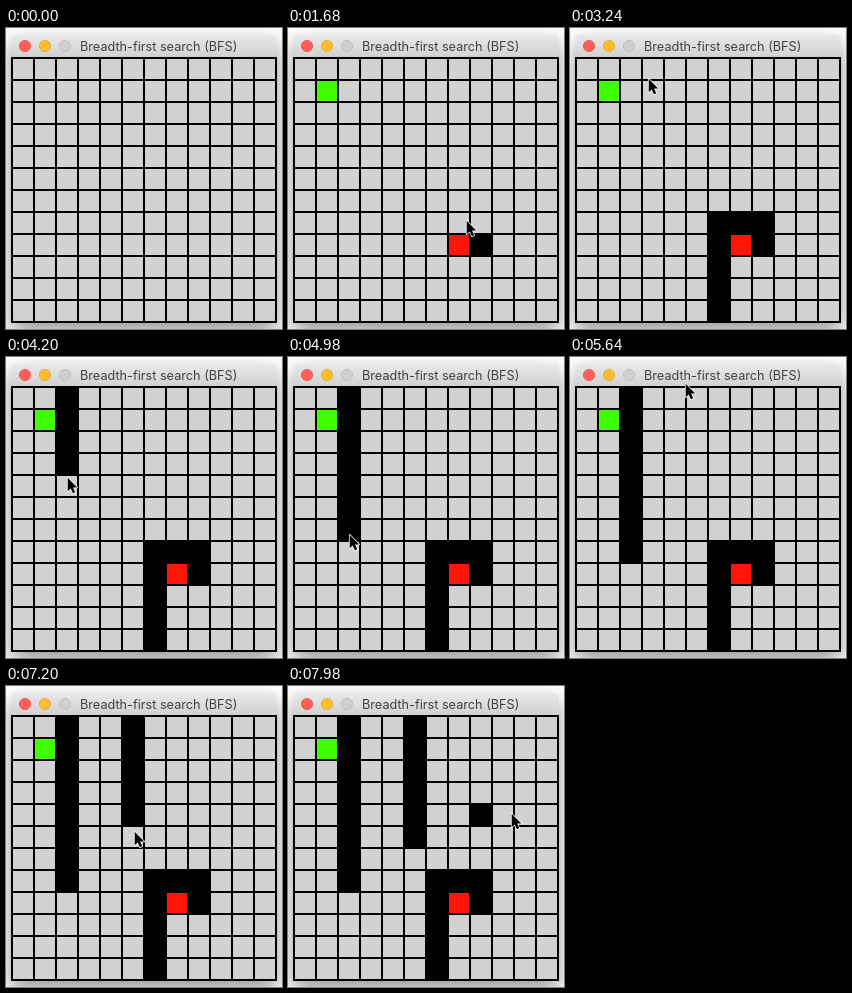
Animation, 276 px wide and 301 px high, one loop 8000 ms. Source, as an HTML page with a canvas:

```html
<!DOCTYPE html>
<html lang="en">
<head>
<meta charset="utf-8">
<title>Breadth-first search (BFS)</title>
<style>
html, body { margin: 0; width: 100%; height: 100%; overflow: hidden; background: #fff; }
canvas { display: block; width: 276px; height: 301px; }
</style>
</head>
<body>
<canvas id="stage" width="276" height="301"></canvas>
<script>
const ctx = document.getElementById('stage').getContext('2d');
const LOOP = 8000, STEP = 60, CELL = 22, COUNT = 12;
const GREEN = '#40ff00', RED = '#ff1408', BLACK = '#000';

// Pointer path: time, x, y
const path = [
  [360, 95, 176], [540, 43, 62], [780, 43, 62],
  [1080, 170, 210], [1320, 193, 216], [1500, 193, 216],
  [1680, 178, 192], [1800, 186, 194], [2100, 152, 195], [2340, 150, 200],
  [2760, 149, 276], [2880, 147, 270], [3120, 104, 132],
  [3240, 78, 50], [3360, 61, 38], [3540, 61, 38],
  [4200, 61, 120], [4380, 61, 126], [4560, 61, 159], [4740, 61, 159],
  [5160, 61, 191], [5280, 65, 150], [5520, 103, 13],
  [5640, 115, 26], [5820, 128, 40], [6360, 129, 83],
  [6420, 128, 92], [7200, 128, 145], [7440, 162, 88],
  [7680, 193, 127], [7800, 194, 127], [7980, 223, 127]
];

function light(x, fill, edge) {
  ctx.beginPath();
  ctx.arc(x, 18, 5.6, 0, Math.PI * 2);
  ctx.fillStyle = fill;
  ctx.fill();
  ctx.strokeStyle = edge;
  ctx.lineWidth = 0.7;
  ctx.stroke();
}

function drawWindow() {
  ctx.fillStyle = '#fff';
  ctx.fillRect(0, 0, 276, 301);
  ctx.save();
  ctx.shadowColor = 'rgba(0,0,0,.42)';
  ctx.shadowBlur = 22;
  ctx.shadowOffsetY = 9;
  const bar = ctx.createLinearGradient(0, 7, 0, 29);
  bar.addColorStop(0, '#e9e9e9');
  bar.addColorStop(1, '#d1d1d1');
  ctx.fillStyle = bar;
  ctx.beginPath();
  ctx.roundRect(5, 7, 266, 288, [5, 5, 0, 0]);
  ctx.fill();
  ctx.restore();

  light(19, '#ff5f56', '#e2463f');
  light(39, '#ffbd2e', '#dfa023');
  light(59, '#cfcfcf', '#b9b9b9');
  ctx.fillStyle = '#434343';
  ctx.font = '12.7px Inter, "Open Sans", sans-serif';
  ctx.fillText('Breadth-first search (BFS)', 74, 23);
}

function fillCell(col, row, color) {
  ctx.fillStyle = color;
  ctx.fillRect(7 + col * CELL, 31 + row * CELL, CELL - 2, CELL - 2);
}

// A wall covers its inner grid lines as well
function wall(t, start, gap, col, row, count, dx = 0, dy = 1) {
  for (let i = 0; i < count && t >= start + i * gap; i++)
    block(col + i * dx, row + i * dy);
}

const walls = new Set();
function block(col, row) {
  walls.add(row * COUNT + col);
}

function drawGrid(t) {
  ctx.fillStyle = BLACK;
  ctx.fillRect(5, 29, 266, 266);
  walls.clear();
  wall(t, 1500, 0, 8, 8, 1);
  wall(t, 1800, 180, 8, 7, 3, -1, 0);
  wall(t, 2400, 120, 6, 8, 4);
  wall(t, 3540, 210, 2, 0, 4);
  wall(t, 4380, 360, 2, 4, 2);
  wall(t, 4980, 180, 2, 6, 2);
  wall(t, 5820, 240, 5, 0, 2);
  wall(t, 6420, 280, 5, 2, 4);
  wall(t, 7740, 0, 8, 4, 1);
  for (let row = 0; row < COUNT; row++)
    for (let col = 0; col < COUNT; col++)
      if (!walls.has(row * COUNT + col)) fillCell(col, row, '#d2d1d2');
  if (t >= 780) fillCell(1, 1, GREEN);
  if (t >= 1140) fillCell(7, 8, RED);
}

function pointerAt(t) {
  const i = path.findIndex(p => p[0] > t);
  if (i < 0) return path[path.length - 1].slice(1);
  const [t0, x0, y0] = path[i - 1], [t1, x1, y1] = path[i];
  const k = (t - t0) / (t1 - t0);
  return [x0 + (x1 - x0) * k, y0 + (y1 - y0) * k];
}

const arrow = new Path2D('M.7 .8V14.2L3.7 11.4L5.9 16.3L8.2 15.3L6.1 10.6H10.2Z');

function drawPointer(t) {
  if (t < path[0][0]) return;
  const [x, y] = pointerAt(t);
  ctx.save();
  ctx.translate(Math.round(x), Math.round(y));
  ctx.lineJoin = 'round';
  ctx.lineWidth = 1.5;
  ctx.strokeStyle = '#fff';
  ctx.stroke(arrow);
  ctx.fillStyle = BLACK;
  ctx.fill(arrow);
  ctx.restore();
}

function frame(now) {
  const t = Math.floor(now % LOOP / STEP) * STEP;
  drawWindow();
  drawGrid(t);
  drawPointer(t);
  requestAnimationFrame(frame);
}
requestAnimationFrame(frame);
</script>
</body>
</html>
```
